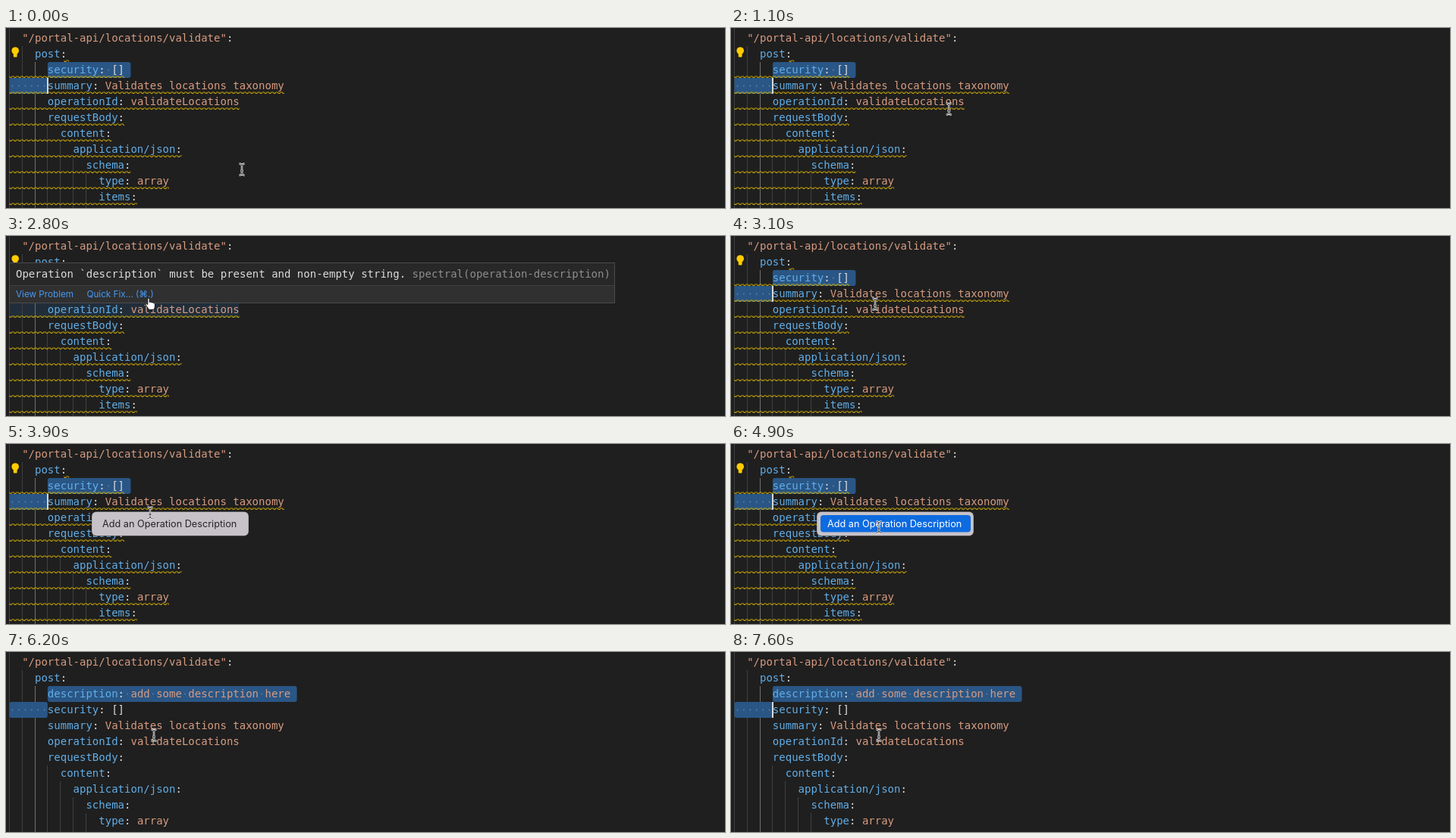
These frames come from a looping animation (948 by 238 pixels, 7.95 s). An HTML page:

```html
<!DOCTYPE html>
<html lang="en">
<head>
<meta charset="utf-8">
<title>Editor quick fix</title>
<style>
html, body { margin: 0; width: 100%; height: 100%; overflow: hidden; background: #1f1f1f; }
svg { display: block; }
text { white-space: pre; }
.code { font: 14px "DejaVu Sans Mono", monospace; fill: #dcdcdc; }
.key { fill: #61aee8; }
.value { fill: #d89b80; }
.dim { fill: #8e8e8e; }
.link { font: 11.7px Inter, sans-serif; fill: #459af5; }
.item { font: 12.7px Inter, sans-serif; }
.select { fill: #2a5685; }
</style>
</head>
<body>
<svg id="stage" width="948" height="238" viewBox="0 0 948 238"></svg>
<script>
const LOOP = 7950, LEFT = 4.3, CHAR = 8.428, ROW = 21, TOP = 3;
const EDIT = 5500, RESOLVED = 6000;

const head = ['  "/portal-api/locations/validate":', '    post:'];
const added = '      description: add some description here';
const body = [
  '      security: []',
  '      summary: Validates locations taxonomy',
  '      operationId: validateLocations',
  '      requestBody:',
  '        content:',
  '          application/json:',
  '            schema:',
  '              type: array',
  '              items:'
];

const colX = col => LEFT + col * CHAR;
const rowY = row => TOP + row * ROW;
const indent = line => line.search(/\S/);
const rect = (x, y, w, h, attrs) =>
  `<rect x="${x}" y="${y}" width="${w}" height="${h}" ${attrs}/>`;

function codeLine(line, row) {
  const [, key, value] = line.match(/^(.*?):(.*)$/);
  const keyClass = key.includes('"') ? 'value' : 'key';
  const valueClass = value.includes('[') ? '' : 'value';
  return `<text class="code" x="${LEFT}" y="${rowY(row) + 15}"><tspan class="${keyClass}">${key}</tspan>:` +
    `<tspan class="${valueClass}">${value}</tspan></text>`;
}

function guides(lines) {
  let out = '';
  for (let col = 0; col < 14; col += 2) {
    const row = lines.findIndex(line => indent(line) > col);
    const y = row ? rowY(row) : 0;
    out += rect(Math.floor(colX(col)), y, 1, 238 - y, `fill="${col === 4 ? '#707070' : '#404040'}"`);
  }
  return out;
}

function wave(line, row) {
  if (row === 0) return '';
  const start = row === 1 ? 72 : 0;
  const end = row === 1 ? 79 : line.length * CHAR;
  return `<g transform="translate(${LEFT} ${rowY(row)})">${rect(start, 18, end - start, 3, 'fill="url(#wave)"')}</g>`;
}

function selection(line) {
  const dot = (col, row) => `<circle cx="${colX(col + .5)}" cy="${rowY(row) + 10.5}" r=".9" fill="#7fa0c0" opacity=".6"/>`;
  let out = rect(colX(6), rowY(2), (line.length - 5) * CHAR, ROW, 'rx="3" class="select"') +
    rect(LEFT, rowY(3), 6 * CHAR, ROW, 'rx="3" class="select"');
  for (let col = 0; col < 6; col++) out += dot(col, 3);
  for (let col = 6; col < line.length; col++) if (line[col] === ' ') out += dot(col, 2);
  return out;
}

function editor(id, lines) {
  return `<g id="${id}">${guides(lines)}${selection(lines[2])}` +
    `<g id="${id}Waves">${lines.map(wave).join('')}</g>${lines.map(codeLine).join('')}</g>`;
}

const beam = 'M-3.5 -7.5Q0 -7.5 0 -5Q0 -7.5 3.5 -7.5M0 -5V5M-3.5 7.5Q0 7.5 0 5Q0 7.5 3.5 7.5M-2 2H2';
const hand = 'M-3.2 -6.5C-3.2 -8.2 -.8 -8.2 -.8 -6.5V-2.2C0 -3.3 1.6 -3 1.8 -1.8C2.6 -2.7 4 -2.3 4.2 -1.2' +
  'C5.2 -1.8 6.4 -1.2 6.4 0V3C6.4 5 5.2 5.6 5.2 7.5H-1.8C-2 5.5 -5 3 -5.8 .8C-6.2 -.6 -4.6 -1 -3.2 .8Z';

const $ = id => document.getElementById(id);

$('stage').innerHTML = `
<defs>
  <pattern id="wave" width="6" height="21" patternUnits="userSpaceOnUse">
    <path transform="translate(0 18)" fill="#d6b000"
      d="M5.5 0L2.5 3H1.1L4.1 0ZM4 0L6 2V.6L5.4 0ZM0 2L1 3H2.4L0 .6Z"/>
  </pattern>
</defs>
${rect(0, 0, 948, 238, 'fill="#1f1f1f"')}
${rect(LEFT, rowY(4), 30 * CHAR + 50, ROW, 'id="range" fill="#264f78" opacity=".3"')}
${editor('before', [...head, ...body])}
${editor('after', [...head, added, ...body.slice(0, -1)])}
${rect(54, rowY(3), 2, ROW, 'id="caret" fill="#d8d8d8"')}
<g id="bulb" fill="#ffcc00"><circle cx="12.2" cy="30" r="4.8"/>${rect(9.8, 33, 4.8, 5.5, 'rx="1"')}</g>
<g id="tip">
  ${rect(4.5, 35.5, 798, 53, 'fill="#282829" stroke="#4b4b4b"')}
  ${rect(5, 65, 797, 23, 'fill="#303031"')}
  ${rect(5, 65, 797, 1, 'fill="#404040"')}
  <text class="code" x="13" y="55">Operation \`description\` must be present and non-empty string. <tspan class="dim">spectral(operation-description)</tspan></text>
  <text class="link" x="13" y="81">View Problem</text>
  <text class="link" x="106.5" y="81">Quick Fix... (⌘.)</text>
</g>
<g id="menu">
  ${rect(113, 89.5, 207, 32, 'rx="6" fill="#c7c2c7" stroke="#111" stroke-opacity=".5" stroke-width=".6"')}
  ${rect(118, 94, 198, 22.5, 'id="active" rx="4" fill="#0d6be0"')}
  <text id="label" class="item" x="127" y="110">Add an Operation Description</text>
</g>
<g id="pointer">
  <g id="beam" fill="none"><path d="${beam}" stroke="#fff" stroke-width="2.4"/><path d="${beam}" stroke="#222" stroke-width=".9"/></g>
  <path id="hand" d="${hand}" fill="#fff" stroke="#111" stroke-width="1"/>
</g>`;

// time, x, y
const route = [
  [0, 311, 187], [100, 311, 187], [800, 289, 112], [1200, 287, 106], [1500, 287, 106],
  [2100, 270, 101], [2500, 190, 90], [3300, 190, 90], [3400, 190, 91], [3900, 190, 91],
  [4400, 195, 110], [LOOP, 195, 110]
];

function pointerAt(t) {
  const i = route.findIndex(stop => stop[0] > t);
  const [t0, x0, y0] = route[i - 1], [t1, x1, y1] = route[i];
  const k = (t - t0) / (t1 - t0), ease = k * k * (3 - 2 * k);
  return [x0 + (x1 - x0) * ease, y0 + (y1 - y0) * ease];
}

const show = (id, on) => $(id).style.display = on ? '' : 'none';

function draw(now) {
  const t = Math.floor(now % LOOP / 100) * 100;
  const edited = t >= EDIT, tip = t >= 1400 && t < 3100;
  const active = t >= 4100, pressing = t >= 2700 && t < 3100;

  show('before', !edited);
  show('after', edited);
  show('afterWaves', t < RESOLVED);
  show('bulb', !edited);
  show('range', tip);
  show('tip', tip);
  show('caret', edited ? (t + 400) % 1000 < 500 || t < 5600 : (t + 300) % 1000 < 500);

  show('menu', t >= 3300 && t < EDIT);
  show('active', active);
  $('menu').style.opacity = Math.min(1, Math.max(0, (EDIT - t) / 300));
  $('label').style.fill = active ? '#fff' : '#262426';

  show('hand', pressing);
  show('beam', !pressing);
  $('pointer').setAttribute('transform', `translate(${pointerAt(t)})`);
}

const begin = performance.now();
function tick() {
  draw(performance.now() - begin);
  requestAnimationFrame(tick);
}
tick();
</script>
</body>
</html>
```
